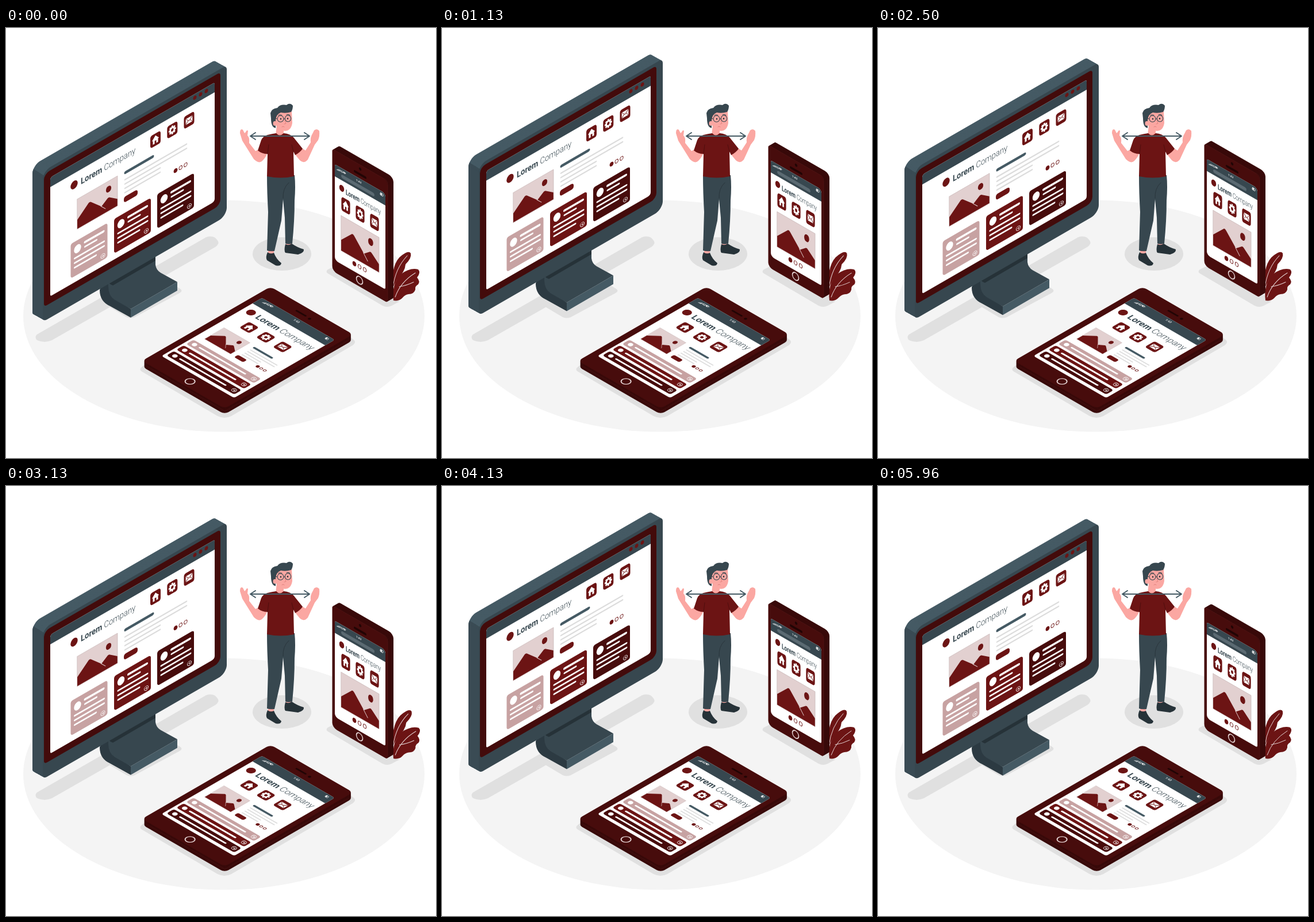
These frames come from a looping animation (748x748 px, 6 s). An HTML page with a canvas:

```html
<!DOCTYPE html>
<html lang="en">
<head>
<meta charset="utf-8">
<title>Responsive devices</title>
<style>
html, body { margin: 0; width: 100%; height: 100%; overflow: hidden; background: #fff; }
canvas { display: block; width: 748px; height: 748px; }
</style>
</head>
<body>
<canvas id="stage" width="748" height="748"></canvas>
<script>
const c = document.getElementById('stage').getContext('2d');
const SLATE = '#37474f', STEEL = '#455a64', INK = '#263238', SHADE = '#e0e0e0', WHITE = '#fff';
const RED = '#6c1414', DEEP = '#470c0c', NIGHT = '#380909';
const ROSE = '#c7a2a2', BLUSH = '#e2d0d0', SKIN = '#fba7a2', GREY = '#dcdcdc';
const LOOP = 6000, RISE = 15, FRAME = 125 / 3;

// ---- helpers ----
function fill(path, color) { c.fillStyle = color; c.fill(new Path2D(path)); }
function stroke(path, color, width = 1) {
  c.strokeStyle = color; c.lineWidth = width;
  c.lineCap = c.lineJoin = 'round';
  c.stroke(new Path2D(path));
}
function oval(x, y, rx, ry, color) {
  c.beginPath(); c.ellipse(x, y, rx, ry, 0, 0, 7);
  c.fillStyle = color; c.fill();
}
function ring(x, y, rx, ry, color, width) {
  c.beginPath(); c.ellipse(x, y, rx, ry, 0, 0, 7);
  c.strokeStyle = color; c.lineWidth = width; c.stroke();
}
function box(x, y, w, h, r, color) {
  c.beginPath(); c.roundRect(x, y, w, h, r);
  c.fillStyle = color; c.fill();
}
function bar(x1, x2, y, color, width) { stroke(`M${x1} ${y}H${x2}`, color, width); }
function within(matrix, draw) {
  c.save(); c.transform(...matrix); draw(); c.restore();
}

// ---- page parts shared by the three screens ----
const glyphs = {
  home() {
    fill('M-7 0L0 -7L7 0H5V6H1.6V1.5H-1.6V6H-5V0Z', WHITE);
  },
  gear() {
    for (let i = 0; i < 8; i++) {
      c.save(); c.rotate(i * Math.PI / 4);
      box(-1.6, -7, 3.2, 4, .6, WHITE);
      c.restore();
    }
    oval(0, 0, 5.2, 5.2, WHITE);
    oval(0, 0, 2.5, 2.5, RED);
  },
  mail() {
    box(-6.5, -4.8, 13, 9.6, .8, WHITE);
    stroke('M-6 -4.2L0 1L6 -4.2M-6 4.2L-2 0M6 4.2L2 0', RED, .8);
  }
};
function icons(xs, y, w, h) {
  Object.keys(glyphs).forEach((name, i) => within([w / 20, 0, 0, h / 20, xs[i], y], () => {
    box(-10, -10, 20, 20, 4, RED);
    glyphs[name]();
  }));
}
function title(x, y, size, squeeze) {
  within([squeeze, 0, 0, 1, x, y], () => {
    c.fillStyle = SLATE;
    c.font = `700 ${size}px Roboto, sans-serif`;
    c.fillText('Lorem ', 0, 0);
    const next = c.measureText('Lorem ').width;
    c.font = `300 ${size}px Roboto, sans-serif`;
    c.fillText('Company', next, 0);
  });
}
function picture(x, y, w, h) {
  within([w / 70, 0, 0, h / 52, x, y], () => {
    box(0, 0, 70, 52, 0, BLUSH);
    oval(54.5, 14, 4.6, 5.4, RED);
    fill('M0 36L20 18Q22 17 24 19L42 37L53 29Q55 28 57 30L70 40V52H0Z', RED);
    stroke('M41 36L49 45', BLUSH, .8);
    stroke('M0 0H70V52H0Z', '#bda9a9', .5);
  });
}
function pager(x, y, step, rx, ry) {
  oval(x, y, rx + .4, ry + .4, RED);
  for (let i = 1; i < 3; i++) ring(x + i * step, y, rx - .3, ry - .3, RED, .9);
}
function arrowMark(x, y, r) {
  ring(x, y, r, r, WHITE, .8);
  stroke(`M${x - 1.6} ${y}h3.2m-1.4 -1.4l1.4 1.4l-1.4 1.4`, WHITE, .7);
}
function statusBar(left, mid, right, y, s) {
  for (let i = 0; i < 4; i++) box(left + i * 1.5 * s, y + 1.5 - i * s, 1 * s, (1 + i) * s, 0, WHITE);
  c.fillStyle = WHITE;
  c.font = `500 ${5.6 * s}px Roboto, sans-serif`;
  c.fillText('4G', left + 6 * s, y + 2);
  const wx = left + 16 * s;
  for (let r = 1; r < 4; r++) {
    c.beginPath(); c.arc(wx, y + 2, r * 1.3 * s, -2.4, -.75);
    c.strokeStyle = WHITE; c.lineWidth = .8; c.stroke();
  }
  c.textAlign = 'center';
  c.fillText('1:43', mid, y + 2);
  c.textAlign = 'left';
  c.beginPath(); c.roundRect(right - 2.5, y - 1.8, 5, 4, 1);
  c.strokeStyle = WHITE; c.lineWidth = .7; c.stroke();
  box(right - 2, y - 1.3, 2.4, 3, 0, WHITE);
}

// ---- scene ----
function ground() {
  oval(379, 501, 349, 201.5, '#f4f4f4');
  fill('M54 533L348 364Q362 359 369 371Q371 376 364 381L80 543Q67 549 54 543Q49 538 54 533Z', SHADE);
  fill('M168 478L210 503Q217 506 224 503L302 461Q309 457 302 453L285 443L180 466Z', SHADE);
  oval(480, 393, 51, 29, SHADE);
  fill('M560 420Q555 424 560 427L655 483Q663 487 671 483L684 476L600 400Z', SHADE);
  fill('M242 586Q228 593 237 598L368 675Q380 681 392 675L603 552Q611 546 603 541L590 530Z', SHADE);
}

function man() {
  // shoes and ankles
  fill('M456 385H466V397H456ZM487 372H497V383H487Z', SKIN);
  fill('M455 390Q451 399 454 404L469 413Q478 415 479 409Q470 402 466 391Q460 394 455 390Z', INK);
  fill('M486 376Q483 387 486 391L508 394Q519 391 518 385Q507 382 497 375Q492 379 486 376Z', INK);
  // trousers
  fill('M454 256H502Q504 275 502 300Q502 335 498 375Q491 377 486 375L485 330L482 298L479 335L467 388Q459 389 454 387L456 320Q454 285 454 256Z', SLATE);
  stroke('M482 296Q481 279 492 269', INK, .8);
  // arms
  fill('M438 212L434 214L423 200Q424 190 420 187L421 179Q419 176 417 181L415 183L412 177Q407 174 407 183L411 196L431 228Q440 237 446 231Q452 225 455 217Z', SKIN);
  fill('M516 210L521 213L530 199Q529 190 533 184L536 178Q541 174 545 179Q546 188 543 195L537 203L525 229Q518 237 511 230L502 219Z', SKIN);
  // neck, shirt
  fill('M471 168H483V187Q477 191 469 187Z', SKIN);
  fill('M455 186Q463 184 470 183Q476 190 483 183Q494 184 500 190L516 210Q511 217 503 221L500 215L501 258Q478 263 454 258L455 219Q445 219 438 213L444 195Q447 188 455 186Z', RED);
  stroke('M455 219L457 203M500 215L497 203', DEEP, .8);
  // head
  fill('M466 150Q478 142 497 145L498 165Q496 179 485 179Q473 178 468 166Z', SKIN);
  fill('M461 157L460 148Q462 140 472 139Q477 132 488 134Q494 129 499 135Q499 142 496 146Q487 149 478 147Q470 150 469 160L469 174Q461 173 461 157Z', SLATE);
  oval(467.5, 166, 3, 4, SKIN);
  stroke('M474 152Q477 150 480 152M488 151Q491 150 494 152', SLATE, 1.1);
  oval(478, 158, 1.2, 1.6, INK);
  oval(490, 157.5, 1.2, 1.6, INK);
  ring(477.5, 158, 5.5, 5.5, SLATE, 1.1);
  ring(490.5, 157.5, 5.2, 5.5, SLATE, 1.1);
  stroke('M466 157L472 158M483 158H485.3', SLATE, 1);
  stroke('M485 160L487 166L484 167M480 172Q482 170 484 172', '#df7f7b', .9);
  // arrow between the hands
  stroke('M425 188H528M434 182L425 188L434 194M519 182L528 188L519 194', STEEL, 2);
}

function plant(angle) {
  c.save();
  c.translate(677, 473); c.rotate(angle); c.translate(-677, -473);
  fill('M671 455Q670 408 689 395Q701 386 704 392Q706 400 695 411Q694 424 680 438Z', RED);
  fill('M674 474Q670 446 687 428Q704 416 717 420Q722 425 715 434Q721 441 717 446Q711 449 712 455Q710 463 700 463Q694 464 690 469Q684 476 674 474Z', RED);
  stroke('M673 452Q677 418 698 396', BLUSH, 1);
  stroke('M677 468Q686 442 712 426M684 450Q697 448 709 442', BLUSH, 1);
  c.restore();
}

function card(x, color) {
  box(x, 396.5, 64, 60, 4, color);
  oval(x + 12, 411.5, 6.2, 7.2, WHITE);
  bar(x + 25, x + 57, 407.5, WHITE, 4);
  bar(x + 25, x + 45, 415.5, WHITE, 3);
  bar(x + 7, x + 58, 425.5, WHITE, 3);
  bar(x + 7, x + 58, 433.5, WHITE, 3);
  bar(x + 7, x + 44, 441.5, WHITE, 3);
  arrowMark(x + 56, 449.5, 3.6);
}

function monitor() {
  // stand
  fill('M163 456Q165 446 180 438L190 470L217 489V504L181 484Q163 476 163 456Z', '#2c3a42');
  fill('M178 436L260 390V412Q261 421 269 426L298 442L217 489L189 473Q178 466 178 450Z', SLATE);
  fill('M178 430L260 390V405L186 448Q179 446 178 440Z', INK);
  fill('M217 489L298 442V457L217 504Z', STEEL);

  // the skew sharpens two corners, so those take a smaller radius
  const skew = [1, -.577, 0, 1, 0, 44.4];
  const shell = (dx, color) => within([1, 0, 0, 1, dx, dx * .56], () =>
    within(skew, () => box(64, 242, 320, 262, [14, 7, 14, 7], color)));
  for (let dx = -18; dx < 0; dx++) shell(dx, STEEL);
  c.save();
  c.clip(new Path2D('M40 241L70 260V530H40Z'));
  for (let dx = -18; dx < 0; dx++) shell(dx, '#3a4b54');
  c.restore();
  shell(0, SLATE);

  within(skew, () => {
    box(66, 248, 307, 231, [10, 5, 10, 5], '#430b0b');
    box(77, 260, 286, 207, [5, 3, 5, 3], WHITE);
    box(77, 260, 286, 17, [5, 3, 0, 0], SLATE);
    for (let i = 0; i < 3; i++) oval(328.5 + i * 10, 266.5, 3, 3.3, RED);
    oval(118.5, 297, 6.2, 7, RED);
    title(130, 303, 15, .866);
    icons([260, 289.3, 318.5], 300, 18, 21.5);
    picture(124, 325, 70, 52);
    bar(208, 255, 327, STEEL, 5);
    bar(207, 314, 339, GREY, 2.6);
    bar(207, 314, 346.5, GREY, 2.6);
    bar(207, 268, 354, GREY, 2.6);
    bar(207, 268, 361.5, GREY, 2.6);
    box(205, 368.5, 24, 10, 4, RED);
    pager(295, 374, 8.7, 3, 3.4);
    card(112.5, ROSE);
    card(188, RED);
    card(263, DEEP);
  });
}

function tablet() {
  const iso = [.866, .5, -.866, .5, 460, 452];
  for (let z = 10; z >= 0; z--) {
    within([1, 0, 0, 1, 0, z], () => within(iso, () => box(-2, -2, 166, 258, 8, z ? NIGHT : DEEP)));
  }
  stroke('M246 589L380 666M380 667L594 544', '#5c2020', .4);
  within(iso, () => {
    bar(66, 84, 13.5, '#210505', 3.2);
    oval(93, 14.5, 2.3, 2.3, '#210505');
    box(9, 26, 146, 202, 4, WHITE);
    box(9, 26, 146, 19, [4, 4, 0, 0], SLATE);
    statusBar(17, 84, 145, 31.5, 1);
    oval(23.5, 62.5, 7, 7, RED);
    title(36, 68, 15.4, 1);
    icons([47.7, 81.4, 115], 90.5, 20, 20);
    picture(23, 116, 52, 39);
    bar(88, 123, 120.5, STEEL, 3.8);
    bar(88, 141, 128, GREY, 1.8);
    bar(88, 141, 133.5, GREY, 1.8);
    bar(88, 119, 139, GREY, 1.8);
    bar(88, 119, 144.5, GREY, 1.8);
    box(84, 149, 18, 8, 3, RED);
    pager(124, 149.5, 7, 2.5, 2.5);
    [ROSE, RED, DEEP].forEach((color, i) => {
      const y = 175 + i * 19.7;
      box(13, y - 7.5, 136, 15, 4, color);
      oval(22.5, y, 4, 4, WHITE);
      bar(33, 124, y, WHITE, 3.2);
      arrowMark(141.5, y, 3.8);
    });
    ring(82, 243.5, 7, 7, BLUSH, 1.7);
  });
}

function phone() {
  const skew = [1, .577, 0, 1, 0, -327.7];
  for (let d = 10; d >= 0; d--) {
    within([1, 0, 0, 1, d, -d * .58], () =>
      within(skew, () => box(567.5, 210.5, 96.5, 212.5, [4, 8, 4, 8], d ? NIGHT : DEEP)));
  }
  stroke('M570 212L660 264Q664 267 664 273V473', '#5c2020', .4);
  within(skew, () => {
    oval(616, 218, 2.2, 2.5, '#210505');
    bar(607, 625, 227.5, '#210505', 4);
    box(572, 235, 88, 167, [3, 6, 3, 6], WHITE);
    box(572, 235, 88, 21, [3, 6, 0, 0], SLATE);
    statusBar(575, 613.5, 653.5, 240.5, .85);
    bar(586, 638, 249, '#5b6a72', 6);
    oval(584, 270, 4.2, 5.6, RED);
    title(591, 276.5, 12.6, .66);
    icons([591, 616, 641], 296.5, 15.2, 24);
    picture(583, 318, 66, 61);
    pager(606, 388.5, 9, 2.9, 3.7);
    ring(615, 412, 5.5, 6.3, BLUSH, 1.6);
  });
}

// ---- motion ----
function hover(t, period) {
  const p = t % period / period;
  return -RISE * (1 - Math.abs(1 - 2 * p));
}
function sway(t) {
  return t < 3750 ? .021 * Math.sin(t / 2500 * 2 * Math.PI) : 0;
}
function lifted(dy, draw) { within([1, 0, 0, 1, 0, dy], draw); }

function render(now) {
  const step = Math.floor((now % LOOP + 4) / FRAME);
  const t = (step + .5) * FRAME % LOOP;
  c.setTransform(1, 0, 0, 1, 0, 0);
  c.fillStyle = WHITE;
  c.fillRect(0, 0, 748, 748);
  ground();
  man();
  plant(sway(t));
  lifted(hover(t, 3000), monitor);
  tablet();
  lifted(hover(t, 1500), phone);
}

const start = performance.now();
function tick() {
  render(performance.now() - start);
  requestAnimationFrame(tick);
}
tick();
</script>
</body>
</html>
```
